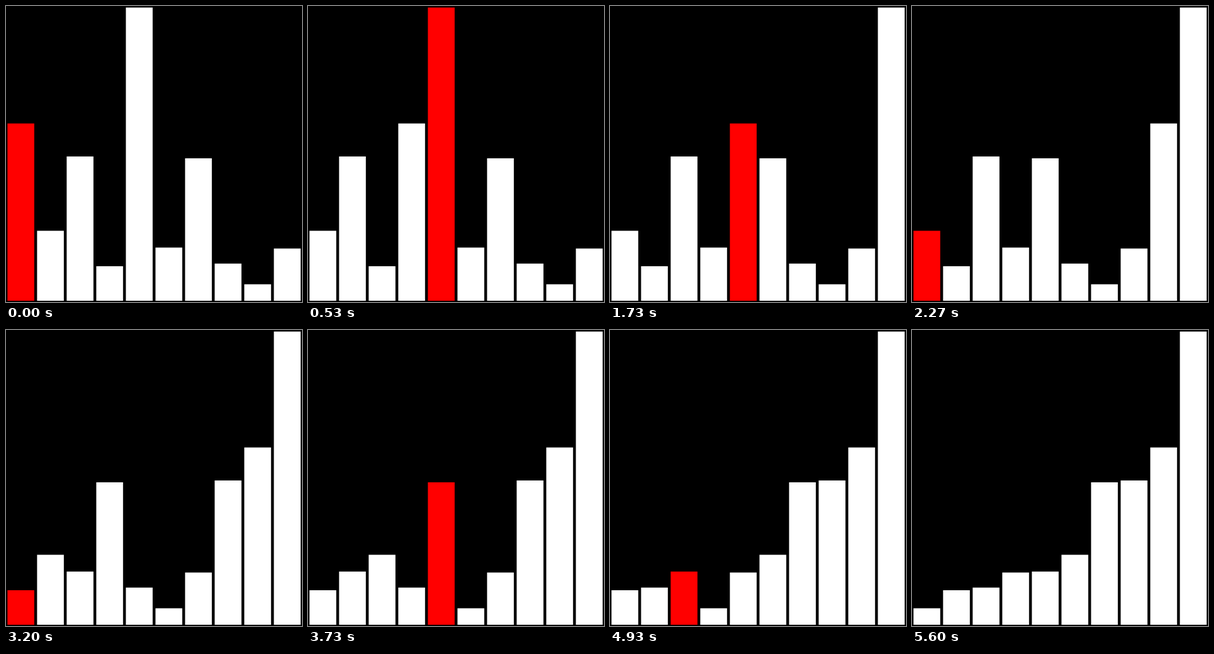
Write an HTML page with a canvas that moves like this. It is 480 px wide and 480 px high and loops after 5870 ms.

```html
<!DOCTYPE html>
<html lang="en">
<head>
<meta charset="utf-8">
<title>Bubble sort</title>
<style>
  html, body { margin: 0; width: 100%; height: 100%; overflow: hidden; background: #000; }
  canvas { display: block; width: 100vw; height: 100vh; }
</style>
</head>
<body>
<canvas id="stage" width="480" height="480"></canvas>
<script>
const LOOP = 5870;
const STEP = 400 / 3;
const END = 5600;
const PITCH = 48, LEFT = 2.4, WIDTH = 43.4, FLOOR = 478;
const tops = [190.5, 364.5, 244, 422, 2.5, 391.7, 247, 417.7, 451.3, 393.3];
const ctx = document.getElementById("stage").getContext("2d");

// Every 15th step shows up half a beat late.
function stepTime(n) {
  const late = n > 0 && n % 15 === 0 ? STEP / 2 : 0;
  return Math.round((n * STEP + late) / 10) * 10;
}

// Records the bars before each comparison, then the sorted result.
function bubbleSort(start) {
  const bars = start.slice(), steps = [];
  for (let last = bars.length - 1; last > 0; last--) {
    for (let j = 0; j < last; j++) {
      const time = stepTime(steps.length);
      if (time < END) steps.push({ time, bars: bars.slice(), active: j });
      if (bars[j] < bars[j + 1]) {
        [bars[j], bars[j + 1]] = [bars[j + 1], bars[j]];
      }
    }
  }
  steps.push({ time: END, bars, active: -1 });
  return steps;
}

const steps = bubbleSort(tops);

function draw(t) {
  let current = steps[0];
  for (const step of steps) if (step.time <= t) current = step;
  ctx.fillStyle = "#000";
  ctx.fillRect(0, 0, 480, 480);
  current.bars.forEach((top, i) => {
    ctx.fillStyle = i === current.active ? "#f00" : "#fff";
    ctx.fillRect(LEFT + i * PITCH, top, WIDTH, FLOOR - top);
  });
}

const origin = performance.now();
function tick() {
  draw((performance.now() - origin) % LOOP);
  requestAnimationFrame(tick);
}
tick();
</script>
</body>
</html>
```
